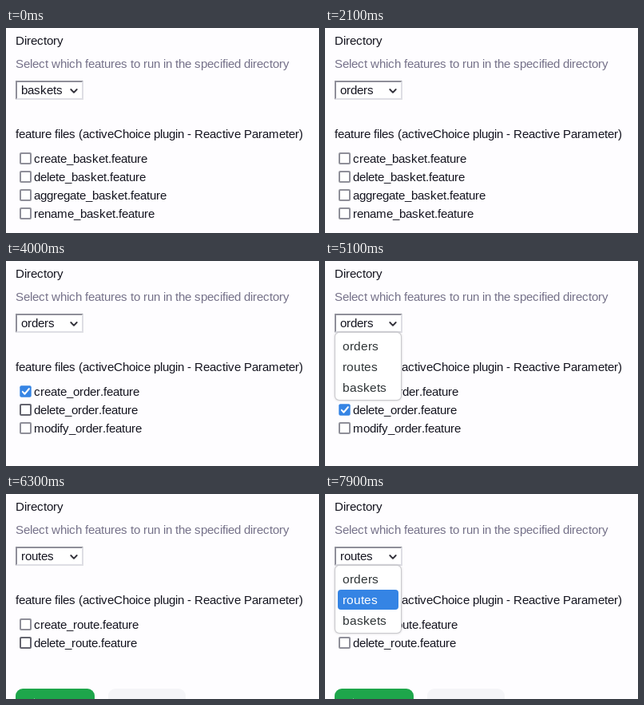
An HTML page with a canvas that plays this animation: 392x257 px, repeating every 8 s.

```html
<!DOCTYPE html>
<html lang="en">
<head>
<meta charset="utf-8">
<title>Reactive feature picker</title>
<style>
html, body { margin: 0; width: 100%; height: 100%; overflow: hidden; background: #fefdff; }
canvas { display: block; width: 392px; height: 257px; }
</style>
</head>
<body>
<canvas id="stage" width="392" height="257"></canvas>
<script>
const ctx = document.getElementById('stage').getContext('2d');
const LOOP = 8000;
const INK = '#14141f', ACCENT = '#3584e4';
const TEXT_SIZE = 15.1, MENU_SIZE = 15.5;
const DIRS = ['orders', 'routes', 'baskets'];
const FILES = {
  baskets: ['create', 'delete', 'aggregate', 'rename'],
  orders: ['create', 'delete', 'modify'],
  routes: ['create', 'delete']
};
const TICK = [[-4.5, 0.5], [-1.5, 4], [-0.5, 4], [5, -2.5], [4.75, -4], [3.5, -4], [-0.5, 1], [-1.5, 1.25], [-3.5, -1]];

// Each step changes part of the form state; `menu` is the highlighted item (-1: none, null: closed).
const START = { dir: 'baskets', list: 'baskets', menu: null, checked: [], hover: null, press: null };
const STEPS = [
  [1500, { menu: 2 }],
  [1600, { menu: 1 }],
  [1700, { menu: 0 }],
  [2100, { menu: null, dir: 'orders' }],
  [2200, { list: 'orders' }],
  [3600, { hover: 1 }],
  [3700, { hover: 0 }],
  [3800, { press: 0 }],
  [3900, { press: null, checked: [0] }],
  [4000, { hover: 1 }],
  [4200, { hover: null }],
  [4300, { hover: 0 }],
  [4400, { press: 0 }],
  [4500, { press: null, checked: [] }],
  [4600, { hover: 1 }],
  [4700, { press: 1 }],
  [4800, { press: null, checked: [1] }],
  [5100, { hover: null, menu: -1 }],
  [5200, { menu: 0 }],
  [5300, { menu: 1 }],
  [5600, { menu: null, dir: 'routes' }],
  [5700, { list: 'routes', checked: [] }],
  [6300, { hover: 1 }],
  [6500, { hover: null }],
  [6600, { hover: 0 }],
  [6800, { press: 0 }],
  [6900, { press: null, checked: [0] }],
  [7400, { hover: null }],
  [7700, { menu: 1 }]
];

function stateAt(t) {
  const s = { ...START };
  for (const [time, change] of STEPS) if (t >= time) Object.assign(s, change);
  return s;
}

// Glyphs advance by whole pixels, as in hinted desktop text.
function text(str, x, y, color = INK, size = TEXT_SIZE) {
  ctx.font = `${size}px "Liberation Sans", Arial, sans-serif`;
  ctx.fillStyle = color;
  for (const ch of str) {
    ctx.fillText(ch, x, y);
    x += Math.round(ctx.measureText(ch).width);
  }
}

function box(x, y, w, h, r, color) {
  ctx.fillStyle = color;
  ctx.beginPath();
  ctx.roundRect(x, y, w, h, r);
  ctx.fill();
}

function line(points, color, width) {
  ctx.strokeStyle = color;
  ctx.lineWidth = width;
  ctx.lineCap = ctx.lineJoin = 'round';
  ctx.beginPath();
  points.forEach(([x, y]) => ctx.lineTo(x, y));
  ctx.stroke();
}

function polygon(points, color) {
  ctx.fillStyle = color;
  ctx.beginPath();
  points.forEach(([x, y]) => ctx.lineTo(x, y));
  ctx.fill();
}

function drawSelect(value) {
  box(12, 66, 85, 24, 0, '#fff');
  polygon([[12, 90], [12, 66], [97, 66], [95, 68], [14, 68], [14, 88]], '#8f8f99');
  polygon([[97, 66], [97, 90], [12, 90], [14, 88], [95, 88], [95, 68]], '#dedee4');
  text(value, 19, 83);
  line([[81.3, 77], [85, 80.8], [88.7, 77]], '#33323b', 1.9);
}

function drawCheckbox(y, checked, hover, press) {
  if (checked) {
    box(17.3, y + 0.3, 14.4, 14.4, 2, press ? '#1b58a8' : hover ? '#256bc4' : ACCENT);
    const k = 15 / 14;
    polygon(TICK.map(([px, py]) => [24.5 + px * k, y + 7.5 + py * k]), '#fff');
    return;
  }
  box(17, y, 15, 15, 2, press ? '#484851' : hover ? '#64646e' : '#8f8f99');
  box(19, y + 2, 11, 11, 0.5, press ? '#e4e4ea' : '#fff');
}

function drawList(s) {
  FILES[s.list].forEach((verb, i) => {
    const y = 156 + i * 23;
    drawCheckbox(y, s.checked.includes(i), s.hover === i, s.press === i);
    text(`${verb}_${s.list.slice(0, -1)}.feature`, 35, y + 13);
  });
}

function drawButtons() {
  box(12, 244, 99, 34, 9, '#1ea64b');
  box(128, 244, 97, 34, 9, '#f5f5f8');
  line([[35, 256.8], [37, 257.8]], 'rgba(255,255,255,.6)', 1);
}

function drawMenu(active) {
  ctx.save();
  ctx.shadowColor = 'rgba(0,0,0,.2)';
  ctx.shadowBlur = 3;
  box(12, 89, 84, 86, 6, '#cacace');
  ctx.restore();
  box(13, 90, 82, 84, 5, '#fff');
  DIRS.forEach((name, i) => {
    const on = i === active;
    if (on) box(16, 94 + i * 26, 76, 25, 4, ACCENT);
    text(name, 22, 112 + i * 26, on ? '#fff' : '#2e3436', MENU_SIZE);
  });
}

function draw(t) {
  const s = stateAt(t);
  box(0, 0, 392, 257, 0, '#fefdff');
  text('Directory', 12, 21);
  text('Select which features to run in the specified directory', 12, 50, '#757189');
  drawSelect(s.dir);
  text('feature files (activeChoice plugin - Reactive Parameter)', 12, 138);
  drawList(s);
  if (s.list === 'routes') drawButtons();
  if (s.menu !== null) drawMenu(s.menu);
}

const begin = performance.now();
function tick() {
  draw((performance.now() - begin) % LOOP);
  requestAnimationFrame(tick);
}
tick();
</script>
</body>
</html>
```
